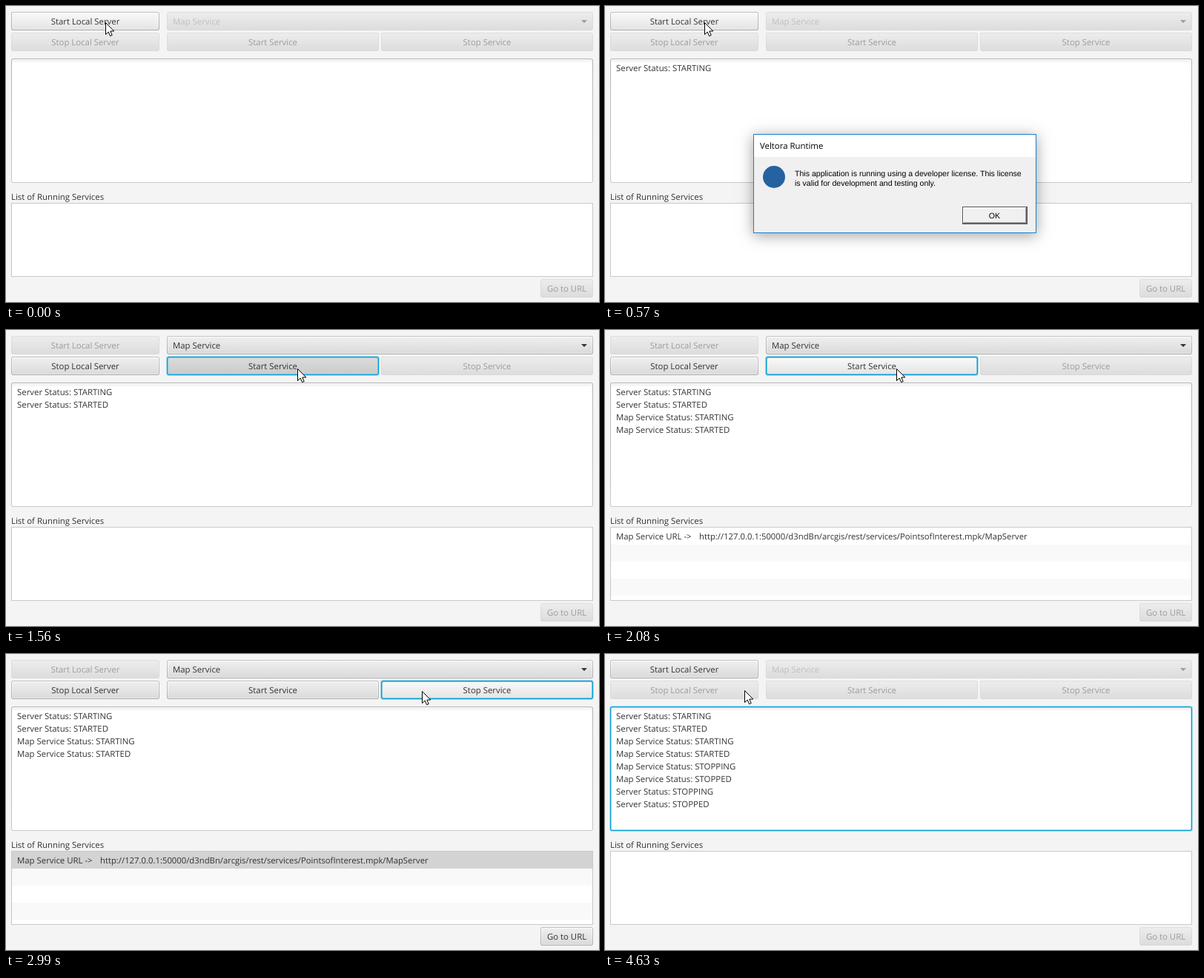
An HTML page with a canvas for the animation above (5.43 s loop, 800 px wide and 400 px high).

```html
<!DOCTYPE html>
<html lang="en">
<head>
<meta charset="utf-8">
<title>Local server demo</title>
<style>
html, body { margin: 0; width: 100%; height: 100%; overflow: hidden; background: #f4f4f4; }
canvas { display: block; }
</style>
</head>
<body>
<canvas id="stage" width="800" height="400"></canvas>
<script>
const ctx = document.getElementById('stage').getContext('2d');
const LOOP = 5430;
const UI_FONT = '11.4px "Open Sans", sans-serif';
const URL_FONT = '11.3px "Open Sans", sans-serif';
const DIALOG_FONT = '10.57px "Liberation Sans", sans-serif';
const FOCUS = '#039ed3';
const FACES = {
  normal: ['#f0f0f0', '#d9d9d9'],
  hover: ['#fafafa', '#e3e3e3'],
  pressed: ['#dcdcdc', '#cacaca']
};
const LOG = [
  'Server Status: STARTING', 'Server Status: STARTED',
  'Map Service Status: STARTING', 'Map Service Status: STARTED',
  'Map Service Status: STOPPING', 'Map Service Status: STOPPED',
  'Server Status: STOPPING', 'Server Status: STOPPED'
];
const SERVICE_URL = 'http://127.0.0.1:50000/d3ndBn/arcgis/rest/services/PointsofInterest.mpk/MapServer';

// Each entry changes only the listed properties, from its time on.
const timeline = [
  [0, { cursor: [134, 22], lines: 0, focus: '', hot: 'startServer', face: 'hover',
        startServer: 1, stopServer: 0, service: 0, stopService: 0, go: 0,
        row: '', dialog: 0, okDown: 0 }],
  [80, { focus: 'startServer', face: 'pressed' }],
  [250, { lines: 1, face: 'hover' }],
  [330, { focus: '', dialog: 0.35 }],
  [410, { dialog: 0.75 }],
  [490, { dialog: 0.95 }],
  [570, { dialog: 1 }],
  [720, { cursor: [527, 288], hot: '' }],
  [800, { okDown: 1 }],
  [880, { dialog: 0.6, okDown: 0 }],
  [960, { dialog: 0.2 }],
  [1050, { dialog: 0 }],
  [1130, { cursor: [393, 52], lines: 2, startServer: 0, stopServer: 1, service: 1,
           focus: 'stopServer', hot: 'startService', face: 'hover' }],
  [1560, { focus: 'startService', face: 'pressed' }],
  [1660, { face: 'hover' }],
  [1720, { lines: 3 }],
  [2000, { lines: 4 }],
  [2080, { row: 'plain' }],
  [2430, { cursor: [398, 278], row: 'selected', focus: 'list', hot: '' }],
  [2510, { stopService: 1, go: 1 }],
  [2910, { cursor: [561, 50], row: 'inactive', focus: 'stopService', hot: 'stopService', face: 'pressed' }],
  [2990, { face: 'hover' }],
  [3660, { lines: 5, row: '', focus: 'log', hot: '', stopService: 0, go: 0 }],
  [3760, { lines: 6 }],
  [4470, { cursor: [188, 49], focus: 'stopServer', hot: 'stopServer', face: 'pressed' }],
  [4550, { lines: 7, stopServer: 0, focus: 'log', hot: '' }],
  [4630, { lines: 8, service: 0, startServer: 1 }]
];

function stateAt(time) {
  const state = {};
  for (const [start, change] of timeline) if (start <= time) Object.assign(state, change);
  return state;
}

function rect(x, y, w, h, color) {
  ctx.fillStyle = color;
  ctx.fillRect(x, y, w, h);
}

function round(x, y, w, h, r, fill) {
  ctx.beginPath();
  ctx.roundRect(x, y, w, h, r);
  ctx.fillStyle = fill;
  ctx.fill();
}

function vertical(y, h, top, bottom) {
  const gradient = ctx.createLinearGradient(0, y, 0, y + h);
  gradient.addColorStop(0, top);
  gradient.addColorStop(1, bottom);
  return gradient;
}

function text(str, x, y, color = '#333', font = UI_FONT, align = 'left') {
  ctx.font = font;
  ctx.fillStyle = color;
  ctx.textAlign = align;
  ctx.fillText(str, x, y);
}

function control(x, y, w, face, focused) {
  const h = 25;
  if (focused) {
    round(x - 1, y - 1, w + 2, h + 2, 4, 'rgba(3,158,211,.3)');
    round(x, y, w, h, 3, FOCUS);
    round(x + 1, y + 1, w - 2, h - 2, 2, '#7cc6e0');
  } else {
    round(x, y, w, h, 3, vertical(y, h, '#c0c0c0', '#acacac'));
    round(x + 1, y + 1, w - 2, h - 2, 2, vertical(y, h, '#fff', '#e6e6e6'));
  }
  round(x + 2, y + 2, w - 4, h - 4, 1.5, vertical(y, h, ...FACES[face]));
}

function button(state, id, label, x, y, w, enabled) {
  ctx.globalAlpha = enabled ? 1 : 0.4;
  control(x, y, w, state.hot === id ? state.face : 'normal', state.focus === id);
  text(label, x + w / 2, y + 17, '#333', UI_FONT, 'center');
  ctx.globalAlpha = 1;
}

function comboBox(enabled) {
  ctx.globalAlpha = enabled ? 1 : 0.4;
  control(217, 8, 575, 'normal', false);
  ctx.beginPath();
  ctx.moveTo(776, 19);
  ctx.lineTo(784, 19);
  ctx.lineTo(780, 23);
  ctx.fillStyle = '#333';
  ctx.fill();
  ctx.globalAlpha = enabled ? 1 : 0.2;
  text('Map Service', 225, 25);
  ctx.globalAlpha = 1;
}

function logArea(state) {
  const focused = state.focus === 'log';
  if (focused) round(6, 70, 787, 170, 4, 'rgba(3,158,211,.3)');
  round(7, 71, 785, 168, 3, focused ? FOCUS : vertical(71, 168, '#b3b3b3', '#c8c8c8'));
  round(8, 72, 783, 166, 2, focused ? '#a9dcec' : '#fff');
  if (focused) round(9, 73, 781, 164, 1, '#fff');
  rect(9, 73, 781, 4, vertical(73, 4, '#ededed', '#fff'));
  LOG.slice(0, state.lines).forEach((line, i) => text(line, 15, 88 + 17 * i));
}

function serviceList(state) {
  const focused = state.focus === 'list';
  text('List of Running Services', 7, 262);
  if (focused) rect(6, 265, 787, 102, 'rgba(3,158,211,.3)');
  rect(7, 266, 785, 100, focused ? FOCUS : '#c8c8c8');
  rect(8, 267, 783, 98, '#fff');
  if (!state.row) return;
  rect(8, 290, 783, 23, '#f9f9f9');
  rect(8, 336, 783, 23, '#f9f9f9');
  if (state.row === 'inactive') rect(8, 267, 783, 23, '#d3d3d3');
  if (state.row === 'selected') {
    rect(8, 267, 783, 23, '#0096c9');
    ctx.strokeStyle = '#4db5d9';
    ctx.lineWidth = 1;
    ctx.strokeRect(9.5, 268.5, 780, 20);
  }
  if (focused) {
    ctx.strokeStyle = '#7cc6e0';
    ctx.strokeRect(8.5, 267.5, 782, 97);
  }
  const color = state.row === 'selected' ? '#fff' : '#333';
  text('Map Service URL ->', 15, 283, color);
  text(SERVICE_URL, 127, 283, color, URL_FONT);
}

function dialog(opacity, okDown) {
  if (!opacity) return;
  const scale = 0.9 + 0.1 * opacity;
  ctx.save();
  ctx.globalAlpha = opacity;
  ctx.translate(391, 240);
  ctx.scale(scale, scale);
  ctx.translate(-391, -240);
  ctx.shadowColor = 'rgba(0,0,0,.38)';
  ctx.shadowBlur = 18;
  ctx.shadowOffsetY = 3;
  rect(200, 173, 382, 134, '#1a7fd0');
  ctx.shadowColor = 'transparent';
  rect(201, 174, 380, 30, '#fff');
  rect(201, 204, 380, 102, '#f0f0f0');
  text('Veltora Runtime', 209, 193, '#000');
  ctx.beginPath();
  ctx.arc(228, 231, 15, 0, 2 * Math.PI);
  ctx.fillStyle = '#2562a0';
  ctx.fill();
  text('This application is running using a developer license. This license', 256, 230, '#000', DIALOG_FONT);
  text('is valid for development and testing only.', 256, 243, '#000', DIALOG_FONT);
  rect(482, 271, 88, 24, '#555');
  rect(483, 272, 86, 22, okDown ? '#a0a0a0' : '#696969');
  rect(483, 272, 85, 21, okDown ? '#a0a0a0' : '#fff');
  rect(484, 273, 84, 20, okDown ? '#f0f0f0' : '#a0a0a0');
  rect(484, 273, 83, 19, '#f0f0f0');
  text('OK', 525.5 + okDown, 287 + okDown, '#000', DIALOG_FONT, 'center');
  ctx.restore();
}

const arrow = new Path2D('M.5 .5V16.5L4.2 13L6.6 18.6L9.2 17.5L6.8 12H11.8Z');
function cursor([x, y]) {
  ctx.save();
  ctx.translate(x, y);
  ctx.fillStyle = '#fff';
  ctx.strokeStyle = '#000';
  ctx.lineWidth = 1;
  ctx.fill(arrow);
  ctx.stroke(arrow);
  ctx.restore();
}

function draw(time) {
  const state = stateAt(time);
  ctx.textRendering = 'geometricPrecision';
  rect(0, 0, 800, 400, '#f4f4f4');
  button(state, 'startServer', 'Start Local Server', 7, 8, 200, state.startServer);
  button(state, 'stopServer', 'Stop Local Server', 7, 36, 200, state.stopServer);
  comboBox(state.service);
  button(state, 'startService', 'Start Service', 217, 36, 286, state.service);
  button(state, 'stopService', 'Stop Service', 506, 36, 286, state.stopService);
  logArea(state);
  serviceList(state);
  button(state, 'go', 'Go to URL', 721, 369, 71, state.go);
  dialog(state.dialog, state.okDown);
  cursor(state.cursor);
}

const begin = performance.now();
function tick() {
  draw((performance.now() - begin) % LOOP);
  requestAnimationFrame(tick);
}
tick();
</script>
</body>
</html>
```
